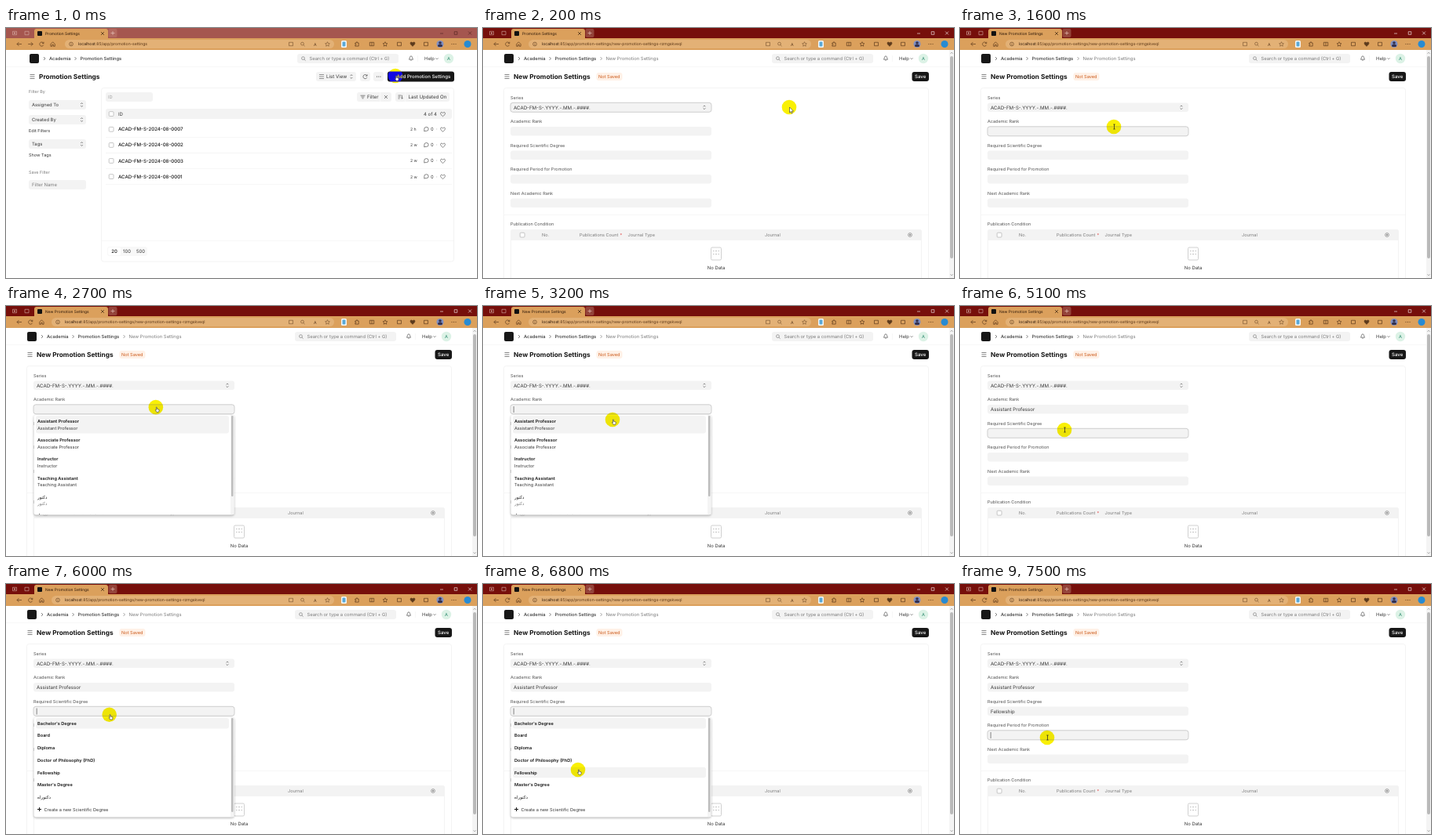
These frames come from a looping animation (600 by 319 pixels, 8 s). An HTML page with a canvas:

```html
<!DOCTYPE html>
<html lang="en">
<head>
<meta charset="utf-8">
<title>Promotion Settings</title>
<style>
html, body { margin: 0; width: 100%; height: 100%; overflow: hidden; background: #fff; }
canvas { display: block; width: 600px; height: 319px; }
</style>
</head>
<body>
<canvas id="stage" width="600" height="319"></canvas>
<script>
const ctx = document.getElementById('stage').getContext('2d');
ctx.textRendering = 'geometricPrecision';
const LOOP = 8000, STEP = 100;
const INK = '#171717', TEXT = '#383838', MUTED = '#7c7c7c', FAINT = '#a3a3a3', FILL = '#f3f3f3', LINE = '#f0f0f0';

// Each phase: start, focused field, open list
const phases = [
  [0, -1], [100, 0], [1100, 1], [2200, 1, 'ranks'], [3800, 1],
  [4600, 2], [5700, 2, 'degrees'], [7000, 2], [7500, 3]
];
// Pointer path: time, x, y, shape from then on
const path = [
  [0, 496, 61, 'hand'], [100, 452, 78, 'arrow'], [200, 390, 101, 'arrow'], [600, 280, 115, 'beam'],
  [1000, 196, 126, 'beam'], [2600, 196, 126, 'hand'], [3200, 165, 145, 'hand'], [3500, 154, 171, 'hand'],
  [3700, 151, 153, 'hand'], [3800, 150, 152, 'arrow'], [4500, 133, 158, 'beam'], [5700, 133, 158, 'beam'],
  [5900, 133, 158, 'hand'], [6800, 121, 237, 'hand'], [7000, 120, 238, 'arrow'], [7300, 111, 196, 'beam']
];

const labels = ['Series', 'Academic Rank', 'Required Scientific Degree', 'Required Period for Promotion', 'Next Academic Rank'];
const ranks = ['Assistant Professor', 'Associate Professor', 'Instructor', 'Teaching Assistant', 'دكتور'];
const degrees = ["Bachelor's Degree", 'Board', 'Diploma', 'Doctor of Philosophy (PhD)', 'Fellowship', "Master's Degree", 'دكتوراه'];

function text(str, x, y, size = 5.8, color = TEXT, weight = 400, align = 'left') {
  ctx.font = `${weight} ${size}px Inter, "Noto Sans", "DejaVu Sans", sans-serif`;
  ctx.fillStyle = color;
  ctx.textAlign = align;
  ctx.fillText(str, x, y);
}
function box(x, y, w, h, fill, r = 0, stroke) {
  ctx.beginPath();
  ctx.roundRect(x, y, w, h, r);
  if (fill) { ctx.fillStyle = fill; ctx.fill(); }
  if (stroke) { ctx.strokeStyle = stroke; ctx.lineWidth = .8; ctx.stroke(); }
}
function dot(x, y, r, fill) {
  ctx.beginPath();
  ctx.arc(x, y, r, 0, 7);
  ctx.fillStyle = fill;
  ctx.fill();
}
function icon(d, x, y, color = '#525252', width = .7, fill) {
  const shape = new Path2D(d);
  ctx.save();
  ctx.translate(x, y);
  if (fill) { ctx.fillStyle = fill; ctx.fill(shape); }
  ctx.strokeStyle = color;
  ctx.lineWidth = width;
  ctx.stroke(shape);
  ctx.restore();
}

const ICON = {
  cross: 'M-2-2L2 2M2-2L-2 2', plus: 'M-2.5 0H2.5M0-2.5V2.5', right: 'M-1-2L1 0L-1 2', down: 'M-1.5-.7L0 .8L1.5-.7',
  updown: 'M-1.4-1L0-2.4L1.4-1M-1.4 1L0 2.4L1.4 1', menu: 'M-3-2.5H3M-3 0H3M-3 2.5H3',
  back: 'M3 0H-3M-.5-2.5L-3 0L-.5 2.5', forward: 'M-3 0H3M.5-2.5L3 0L.5 2.5',
  reload: 'M2.4-1A2.6 2.6 0 1 0 2.4 1.2M2.6-2.8V-.8H.6',
  home: 'M-2.7 0L0-2.7L2.7 0V2.8H.8V.8H-.8V2.8H-2.7Z', ring: 'M2.4 0A2.4 2.4 0 1 1-2.4 0A2.4 2.4 0 1 1 2.4 0',
  search: 'M1.4-.4A1.9 1.9 0 1 1-2.4-.4A1.9 1.9 0 1 1 1.4-.4M.9 1L2.6 2.7',
  bell: 'M-2.5 1.7C-1.5 .5-2-2.7 0-2.7S1.5 .5 2.5 1.7ZM-.7 2.7H.7',
  heart: 'M0 2.8C-5-.8-2.6-4 0-1.6C2.6-4 5-.8 0 2.8Z', bubble: 'M-2.7 2.7V0A2.7 2.5 0 1 1 0 2.2H-1.6Z',
  star: 'M0-2.8L.9-.9L2.9-.7L1.4 .7L1.8 2.7L0 1.7L-1.8 2.7L-1.4 .7L-2.9-.7L-.9-.9Z',
  filter: 'M-3-1.8H3M-2 0H2M-1 1.8H1', sort: 'M-3-2H1M-3 0H0M-3 2H-1M2-2.2V2.2M.8 1L2 2.2L3.2 1',
  puzzle: 'M-2.2-1.5H-.7A.8 .8 0 1 1 .7-1.5H2.2V2.6H-2.2V1.3A.8 .8 0 1 0-2.2 0Z',
  frame: 'M-2.5-2.2H2.5V2.2H-2.5Z', split: 'M-2.7-2.2H2.7V2.2H-2.7ZM0-2.2V2.2',
  arrow: 'M0 0V7L1.6 5.5L2.7 8L3.8 7.5L2.7 5.1H5Z',
  hand: 'M0 0Q.8-.6 1.1 .3V2.3L3.7 3V4.7L3 6.3H.6L-1.1 3.6L-.6 3.2L0 3.8Z', beam: 'M-1.2-3H1.2M0-3V3M-1.2 3H1.2'
};

function browser(title, url, active) {
  const toolbar = '#dba05c', dark = '#5c3a1c';
  box(0, 0, 600, 14, active ? '#760f0b' : '#a5564f');
  box(0, 13, 600, 15, toolbar);
  box(36, 1, 94, 14, toolbar, [3, 3, 0, 0]);
  icon(ICON.frame, 11, 6.5, '#d8b0a8', .6);
  dot(11, 6.5, 1, '#d8b0a8');
  icon(ICON.frame, 26.5, 6.5, '#d8b0a8', .6);
  box(40, 4, 6, 6, '#111', 1);
  text(title, 50, 8.6, 4.9, '#2b1608');
  icon(ICON.cross, 123, 7, '#2b1608', .6);
  box(130.5, 1, 11, 11, active ? '#94443a' : '#b3695f', 2);
  icon(ICON.plus, 136, 6.5, '#eed0c8', .6);
  const control = active ? '#fff' : '#4a201c';
  icon('M-2 0H2', 555, 7, control, .6);
  icon('M-1.8-1.8H1.8V1.8H-1.8Z', 573, 6.5, control, .6);
  icon(ICON.cross, 591, 6.5, control, .6);

  const buttons = active ? ['back', 'reload', 'home'] : ['back', 'forward', 'reload', 'home'];
  buttons.forEach((name, i) => icon(ICON[name], 17 + i * 14.2, 20.5, dark));
  const left = active ? 58 : 75;
  box(left, 15, 418 - left, 11, '#e3b176', 5.5);
  icon(ICON.ring, left + 8, 20.5, dark, .6);
  icon('M0-.3V1.4M0-1.4V-.9', left + 8, 20.5, dark, .6);
  text('localhost', left + 17, 22.4, 5.1, '#2b1608');
  const host = ctx.measureText('localhost').width;
  text(url, left + 17 + host, 22.4, 5.1, '#5a3617');
  icon(ICON.frame, 363, 20.5, dark, .5);
  icon(ICON.search, 378, 20.5, dark, .5);
  text('A', 392, 22.5, 5.2, dark);
  icon(ICON.star, 409.5, 20.5, dark, .5);
  box(427, 16, 7, 9, '#f3f7fa', 1.5);
  box(428.5, 17.5, 4, 6, '#5aa9d8', 1);
  [[447, ICON.puzzle], [466, ICON.split], [483, ICON.star], [501, ICON.frame], [535, ICON.frame]]
    .forEach(([x, d]) => icon(d, x, 20.5, dark));
  icon(ICON.heart, 518, 20.5, dark, .7, dark);
  dot(553, 20.5, 4.5, '#7f8fc4');
  dot(553, 19, 1.8, '#33304d');
  box(550, 21, 6, 3, '#33304d', 1.5);
  [568, 570.5, 573].forEach(x => dot(x, 20.5, .6, dark));
  dot(588, 20.5, 4.5, '#278bd3');
}

function navbar(isForm) {
  box(30, 33, 12, 12, INK, 2);
  icon(ICON.right, 49, 39);
  text('Academia', 55, 41, 5.8, TEXT, 500);
  icon(ICON.right, 88.5, 39);
  text('Promotion Settings', 94.5, 41, 5.8, TEXT, 500);
  if (isForm) {
    icon(ICON.right, 153.5, 39, MUTED);
    text('New Promotion Settings', 159.5, 41, 5.9, MUTED);
  }
  box(371, 33, 129, 12, FILL, 3);
  icon(ICON.search, 379, 39, MUTED);
  text('Search or type a command (Ctrl + G)', 386.5, 41, 5.85, MUTED);
  icon(ICON.bell, 516, 38.5);
  box(524, 35, .5, 8, LINE);
  text('Help', 533, 41, 5.9, TEXT);
  icon(ICON.down, 549, 39);
  dot(564, 39, 6.2, '#dcf2e6');
  text('A', 564, 41, 5.6, '#28866a', 400, 'center');
  box(0, 49.5, 600, .6, LINE);
  icon(ICON.menu, 33.5, 62);
}

function select(label, y) {
  box(29, y - 6, 73, 12, FILL, 3);
  text(label, 33, y + 2, 5.85);
  icon(ICON.updown, 96.5, y);
}
function checkbox(x, y) {
  box(x - 2.8, y - 2.8, 5.8, 5.8, '#fff', 1, '#b8b8b8');
}

function listPage() {
  navbar(false);
  text('Promotion Settings', 42, 65, 8.3, INK, 700);
  box(395, 56, 51, 12, FILL, 3);
  icon(ICON.menu, 402, 62, '#525252', .6);
  text('List View', 408, 64.1, 6.15, TEXT);
  icon(ICON.updown, 440, 62);
  box(451, 56, 13, 12, FILL, 3);
  icon(ICON.reload, 457.5, 62);
  box(468, 56, 13, 12, FILL, 3);
  [472.5, 474.7, 477].forEach(x => dot(x, 62, .6, TEXT));
  box(486, 55.5, 85, 13, INK, 3);
  text('Add Promotion Settings', 497.5, 64.2, 6.1, '#fff', 500);

  text('Filter By', 29, 82.5, 5.4, MUTED);
  select('Assigned To', 98);
  select('Created By', 117);
  text('Edit Filters', 29, 133, 5.5);
  select('Tags', 148);
  text('Show Tags', 29, 164, 5.5);
  text('Save Filter', 29, 185.5, 5.4, MUTED);
  box(29, 194, 73, 12, FILL, 3);
  text('Filter Name', 33, 202, 5.9, MUTED);

  box(121.5, 76.5, 449, 221.5, null, 3, LINE);
  box(127, 82, 60, 12, FILL, 3);
  text('ID', 130, 90, 5.7, FAINT);
  box(447, 82, 44, 12, FILL, 3);
  icon(ICON.filter, 454.5, 88);
  text('Filter', 460, 90.2, 6.1, TEXT);
  box(476.5, 82, .6, 12, '#fff');
  icon(ICON.cross, 484, 88);
  box(496, 82, 69, 12, FILL, 3);
  icon(ICON.sort, 502.5, 88);
  box(508.5, 82, .6, 12, '#fff');
  text('Last Updated On', 512.5, 90.2, 6.15, TEXT);

  box(127, 103, 441, 13, FILL, 3);
  checkbox(134, 109.5);
  text('ID', 143, 111.7, 6);
  text('4 of 4', 549, 111.7, 6, TEXT, 400, 'right');
  icon(ICON.heart, 556.5, 110);
  [7, 2, 3, 1].forEach((id, i) => {
    const y = 129.2 + i * 20.1;
    checkbox(134, y);
    text('ACAD-FM-S-2024-08-000' + id, 143, y + 2.1, 6.1, INK, 500);
    text(i ? '2 w' : '2 h', 515, y + 2, 5.2);
    icon(ICON.bubble, 535.5, y);
    text('0', 541, y + 2, 5.8);
    text('·', 548, y + 2, 5.8);
    icon(ICON.heart, 556.5, y + .3);
    box(127, y + 10, 441, .6, LINE);
  });
  box(122, 271, 449, .6, LINE);
  box(129, 279, 51, 12, '#f8f8f8', 3);
  box(130, 280, 16, 10, '#fff', 2);
  text('20', 138, 287, 6, INK, 500, 'center');
  text('100', 154, 287, 6, TEXT, 400, 'center');
  text('500', 171.5, 287, 6, TEXT, 400, 'center');
}

function formPage(t, start, focus, list) {
  ctx.save();
  ctx.translate(-3, 0);
  navbar(true);
  ctx.restore();
  text('New Promotion Settings', 39, 65, 8.3, INK, 700);
  box(144.5, 57, 33, 10, '#fff1e7', 3);
  text('Not Saved', 147, 64, 5.65, '#cb5a1a');
  box(546.5, 56, 21.5, 12, INK, 3);
  text('Save', 557.2, 64.2, 6.1, '#fff', 500, 'center');

  box(26.5, 76.5, 541, 260, null, 3, LINE);
  const values = ['ACAD-FM-S-.YYYY.-.MM.-.####.', t >= 3800 ? ranks[0] : '', t >= 7000 ? degrees[4] : '', '', ''];
  labels.forEach((label, i) => {
    const y = 101.3 + i * 30.5;
    const active = i === focus;
    text(label, 35, y - 10.5, 5.5, '#525252');
    box(35, y - 5.8, 256, 11.6, FILL, 3);
    if (active) box(35, y - 6, 256, 12, FILL, 3, '#c4c4c4');
    text(values[i], 39, y + 2.2, 6.15);
    if (active && i && (t - start) % 1000 < 500)
      box(38.8 + ctx.measureText(values[i]).width, y - 3.8, .6, 8, TEXT);
  });
  icon(ICON.updown, 282, 101.3);

  box(27, 238, 541, .6, LINE);
  text('Publication Condition', 35, 252, 5.5, '#525252');
  box(35.5, 257.5, 523, 80, null, 3, LINE);
  box(35, 257, 524, 14, FILL, [3, 3, 0, 0]);
  checkbox(50, 264);
  text('No.', 75, 266, 5.6, MUTED);
  text('Publications Count', 123, 266, 5.55, MUTED);
  text('*', 174.5, 266, 5.55, '#e24c4c');
  text('Journal Type', 184.5, 266, 5.6, MUTED);
  text('Journal', 359, 266, 5.6, MUTED);
  icon(ICON.ring, 544, 264, MUTED);
  dot(544, 264, 1, MUTED);
  box(290.5, 280, 13, 16, '#fff', 1.5, '#c4c4c4');
  [284.5, 288.5].forEach(y => icon('M-4 0H-2.5M-1 0H1M2.5 0H4', 297, y, '#a8a8a8'));
  text('No Data', 297, 308, 5.9, TEXT, 400, 'center');

  box(594, 28, 6, 291, '#f4f4f4');
  box(595, 36, 4, 258, '#b9b9b9', 2);
  icon('M-1.5 .7L0-.8L1.5 .7', 597, 32, MUTED);
  icon(ICON.down, 597, 315, MUTED);
  if (list) dropdown(list, pointer(t).y);
}

function dropdown(name, hoverY) {
  const detailed = name === 'ranks';
  const items = detailed ? ranks : degrees;
  const top = detailed ? 139 : 170, height = 127.5, row = detailed ? 24.1 : 15.7;
  ctx.save();
  ctx.shadowColor = '#0005';
  ctx.shadowBlur = 3;
  ctx.shadowOffsetY = 1;
  box(35.5, top, 255, height, '#fff', 3);
  ctx.restore();
  ctx.save();
  ctx.beginPath();
  ctx.rect(35, top, 256, height - .5);
  ctx.clip();
  const hovered = Math.floor((hoverY - top) / row);
  items.forEach((item, i) => {
    const y = top + i * row;
    const weight = /[a-z]/.test(item) ? 600 : 400;
    if (!i || i === hovered) box(38, y + 1, 246, detailed ? 22.5 : 13.4, FILL, 3);
    text(item, 40, y + (detailed ? 10.2 : 9.7), 5.6, INK, weight);
    if (detailed) text(item, 40, y + 18.6, 5.6, i < 4 ? TEXT : MUTED);
  });
  const y = top + items.length * row + (detailed ? 10.3 : 9.6);
  icon(ICON.plus, 42.5, y - 2, INK, 1);
  text('Create a new ' + (detailed ? 'Academic Rank' : 'Scientific Degree'), 48.5, y, 5.6);
  box(286, top, 4.5, height, '#f4f4f4');
  box(287, top + 1, 2.5, detailed ? 103 : 120, '#bdbdbd', 1.2);
  ctx.restore();
}

function pointer(t) {
  const i = path.findLastIndex(key => key[0] <= t);
  const [t0, x0, y0, shape] = path[i];
  const [t1, x1, y1] = path[i + 1] || [LOOP, x0, y0];
  const p = (t - t0) / (t1 - t0);
  return { x: x0 + (x1 - x0) * p, y: y0 + (y1 - y0) * p, shape };
}

function drawPointer(t) {
  const { x, y, shape } = pointer(t);
  // The halo inverts blue: yellow on white, blue on black
  ctx.globalCompositeOperation = 'difference';
  dot(x, y, 9.3, '#060ffa');
  ctx.globalCompositeOperation = 'source-over';
  if (shape === 'beam') icon(ICON.beam, x + .5, y, '#222', .7);
  else icon(ICON[shape], x + .5, y, '#333', .6, '#fff');
}

function draw(t) {
  const [start, focus, list] = phases.findLast(phase => phase[0] <= t);
  const isForm = focus >= 0;
  box(0, 0, 600, 319, '#fff');
  browser(t < 300 ? 'Promotion Settings' : 'New Promotion Settings',
    ':85/app/promotion-settings' + (isForm ? '/new-promotion-settings-rzmgskveql' : ''), isForm);
  if (isForm) formPage(t, start, focus, list);
  else listPage();
  drawPointer(t);
}

function tick() {
  draw(Math.floor(performance.now() % LOOP / STEP) * STEP);
  requestAnimationFrame(tick);
}
tick();
</script>
</body>
</html>
```
